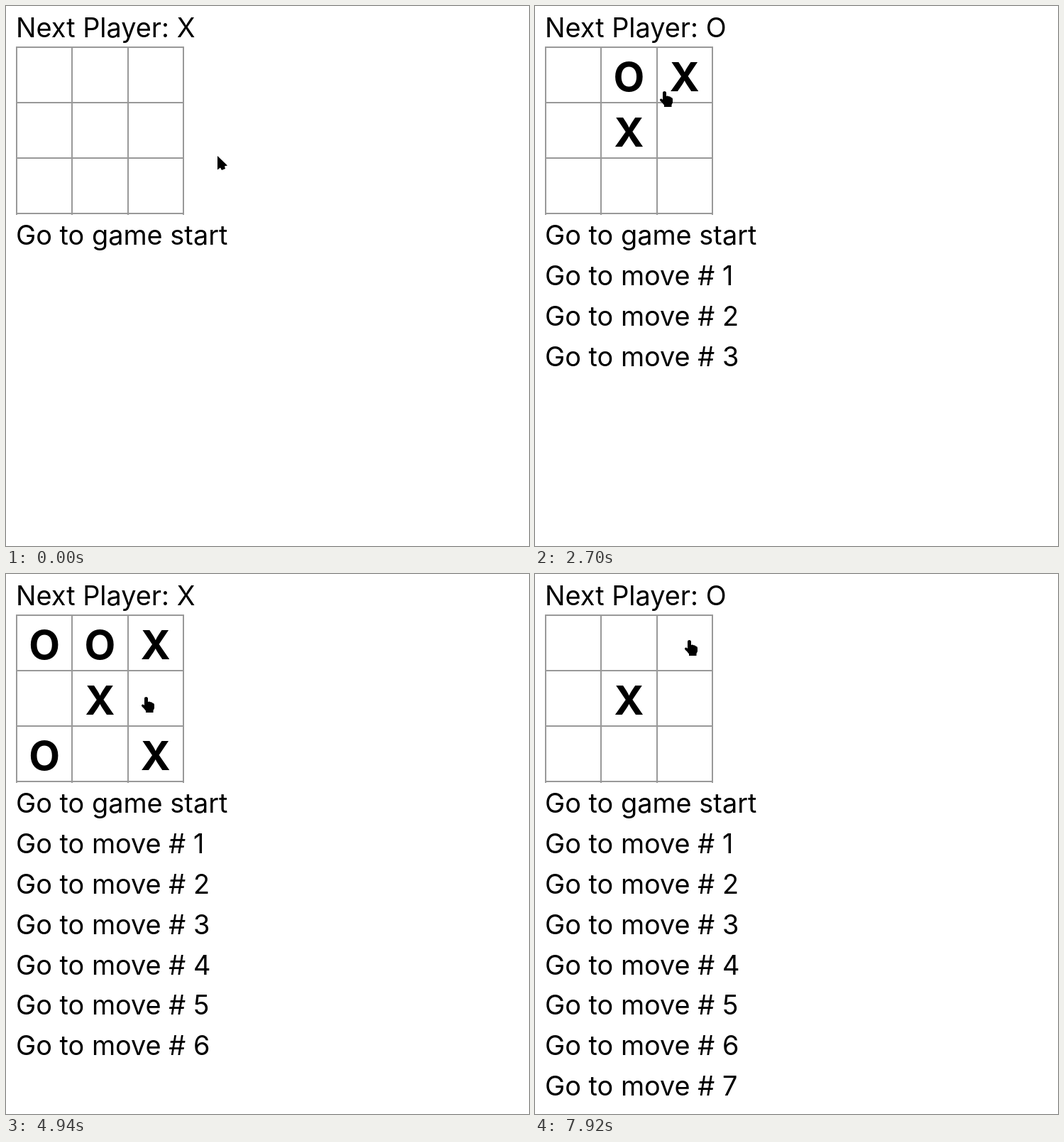
An HTML page that plays this animation: 737x760 px, repeating every 8000 ms.

```html
<!DOCTYPE html>
<html lang="en">
<head>
<meta charset="utf-8">
<title>Tic-tac-toe</title>
<style>
  html, body { margin: 0; width: 100%; height: 100%; overflow: hidden; background: #fff; }
  svg { display: block; width: 100vw; height: 100vh; }
  text { font: 400 37.86px Inter, sans-serif; font-optical-sizing: none; }
  .mark { font-size: 56.8px; font-weight: 700; text-anchor: middle; }
</style>
</head>
<body>
<svg id="stage" viewBox="0 0 737 760"></svg>
<script>
const LOOP = 8000, STEP = 66.15, CELL = 78.25, BACK = 7000;
const stage = document.getElementById('stage');

// Clicks on the board: press time, time the mark appears, cell index
const clicks = [
  [1110, 1180, 4], [1765, 1835, 1], [2430, 2500, 2], [3300, 3365, 6],
  [3765, 3830, 8], [4360, 4425, 0], [5075, 5140, 5]
];

// Pointer hotspot: time, x, y
const path = [
  [0, 298, 212], [320, 298, 212], [850, 141, 179], [1200, 141, 179],
  [1510, 129, 111], [1640, 128, 93], [1975, 128, 93], [2230, 207, 93],
  [2500, 207, 93], [2700, 182, 122], [3160, 70, 250], [3365, 70, 250],
  [3560, 182, 253], [3700, 204, 257], [3830, 204, 257], [4290, 60, 98],
  [4430, 60, 98], [4940, 197, 173], [5010, 203, 177], [5795, 203, 177],
  [6530, 145, 379], [6980, 145, 379], [7790, 210, 115], [7920, 218, 94],
  [LOOP, 218, 94]
];

function add(tag, attrs, text = '') {
  const el = document.createElementNS('http://www.w3.org/2000/svg', tag);
  for (const k in attrs) el.setAttribute(k, attrs[k]);
  el.textContent = text;
  return stage.appendChild(el);
}

const show = (el, on) => el.setAttribute('visibility', on ? 'visible' : 'hidden');

// Board
for (let i = 0; i < 4; i++) {
  const x = Math.floor(14.5 + CELL * i), y = Math.floor(57 + CELL * i);
  add('rect', { x, y: 57, width: 2, height: 237, fill: '#999' });
  add('rect', { x: 14, y, width: 237, height: 2, fill: '#999' });
}

const status = add('text', { x: 14, y: 44.4 });
const marks = clicks.map(([, , cell], i) => add('text', {
  class: 'mark',
  x: 54.2 + CELL * (cell % 3),
  y: 119.6 + CELL * Math.floor(cell / 3)
}, i % 2 ? 'O' : 'X'));
const links = Array.from({ length: 8 }, (_, i) =>
  add('text', { x: 14, y: 336.4 + 56.8 * i }, i ? `Go to move # ${i}` : 'Go to game start'));

// Pointer
const arrow = add('path', { d: 'M0-1V18.5L4 15.5L6 19L11 17L10 13.5L14 12.5Z' });
const hand = add('path', {
  d: 'M-3 1Q-3-1-.5-1Q2-1 2 1.5V6Q4 5 5.5 6.3Q8 6 8.8 7.8Q11 7.8 11 10.5V15L9.5 18V21H-1V18.5' +
     'Q-3.5 15-6 13Q-8 10.5-6 9.7Q-4.5 9.3-3 11Z'
});
const flash = add('circle', { r: 14, fill: '#fff000', opacity: .55 });

// Slope at a knot; zero where the pointer rests
function slope(i, k) {
  const a = path[i - 1], b = path[i], c = path[i + 1];
  if (!a || !c) return 0;
  const still = (p, q) => p[1] === q[1] && p[2] === q[2];
  return still(a, b) || still(b, c) ? 0 : (c[k] - a[k]) / (c[0] - a[0]);
}

function pointer(t) {
  const n = path.findIndex(p => p[0] > t), i = n < 0 ? path.length - 2 : n - 1;
  const a = path[i], b = path[i + 1], d = b[0] - a[0], u = (t - a[0]) / d;
  const s = u * u * (3 - 2 * u);
  return [1, 2].map(k => a[k] + (b[k] - a[k]) * s +
    d * u * (1 - u) * (slope(i, k) * (1 - u) - slope(i + 1, k) * u));
}

function render(t) {
  const made = clicks.filter(c => t >= c[1]).length;
  const move = t >= BACK ? 1 : made;
  status.textContent = move === 7 ? 'Winner is: X' : `Next Player: ${move % 2 ? 'O' : 'X'}`;
  marks.forEach((m, i) => show(m, i < move));
  links.forEach((l, i) => show(l, i <= made));

  // The pointer is sampled at a fixed rate
  const tick = Math.max(0, 380 + Math.floor((t - 372) / STEP) * STEP);
  const [x, y] = pointer(tick);
  const at = `translate(${Math.round(x)} ${Math.round(y)})`;
  for (const el of [arrow, hand, flash]) el.setAttribute('transform', at);
  show(arrow, x > 251);
  show(hand, x <= 251);
  show(flash, clicks.some(c => t >= c[0] && t < c[1]) || (t >= 6860 && t < BACK));
}

function frame() {
  render(performance.now() % LOOP);
  requestAnimationFrame(frame);
}
frame();
</script>
</body>
</html>
```
